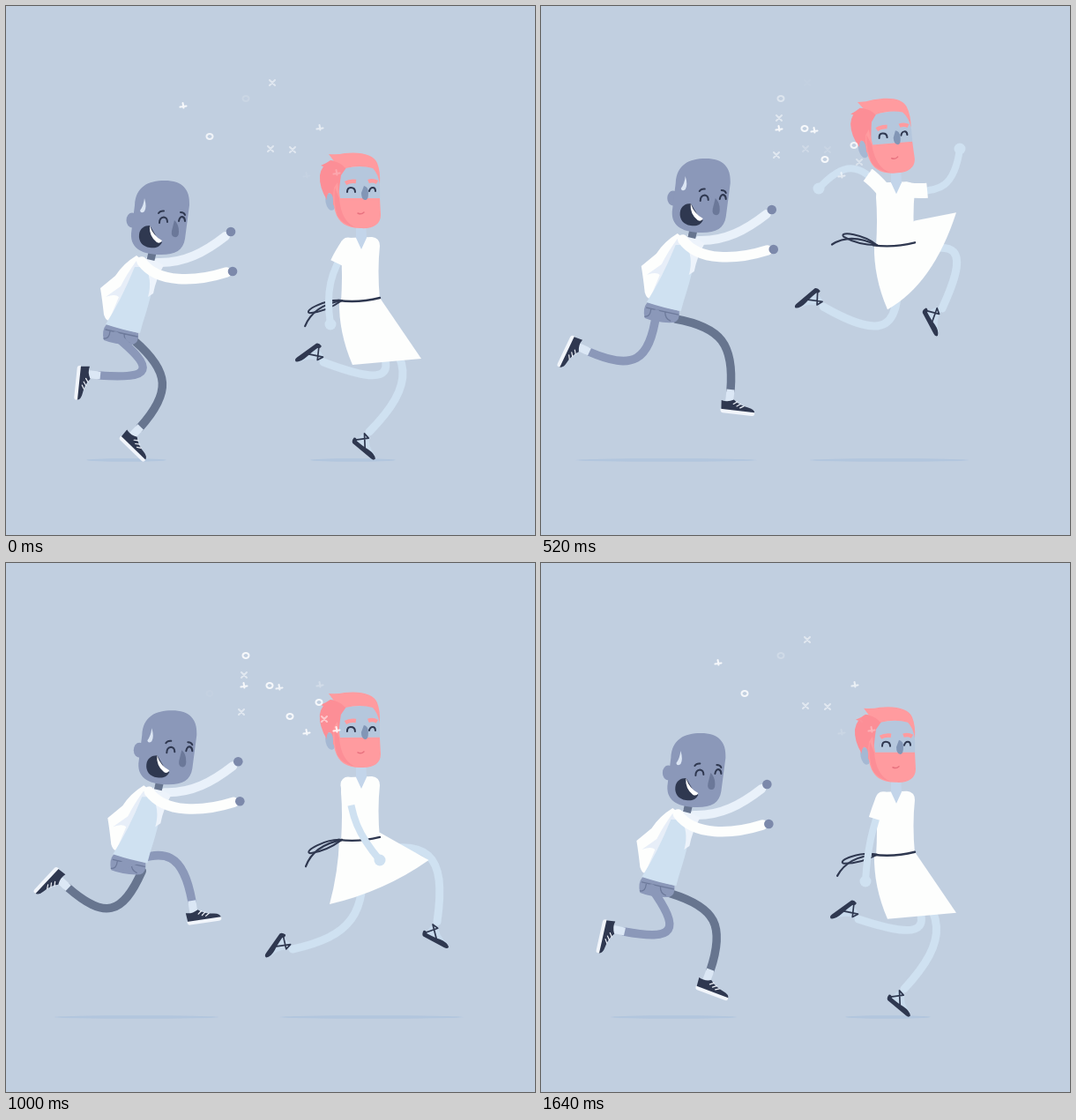
An HTML page with a canvas that plays this animation: 600 by 600 pixels, repeating every 1.68 s.

```html
<!DOCTYPE html>
<html lang="en">
<head>
<meta charset="utf-8">
<title>Chase</title>
<style>
html, body { margin: 0; width: 100%; height: 100%; overflow: hidden; background: #c1cfe0; }
canvas { display: block; width: 100vw; height: 100vh; }
</style>
</head>
<body>
<canvas id="stage" width="600" height="600"></canvas>
<script>
const ctx = document.getElementById('stage').getContext('2d');
const LOOP = 1680, STRIDE = LOOP / 2, STEP = 40;
const SKY = '#c1cfe0', WHITE = '#fdfefd', INK = '#2f3850';
const SKIN = '#cfe1f1', DENIM = '#8b98b9', DARK = '#67758f', HAND = '#7c89ab';

// Smooth periodic interpolation through a few key poses.
function track(period, times, rows) {
  const n = times.length;
  const row = i => rows[(i + n) % n];
  const span = i => (times[(i + 1 + n) % n] - times[(i + n) % n] + period) % period;
  const rate = (i, k) => (row(i + 1)[k] - row(i)[k]) / span(i);
  const slope = (i, k) =>
    (rate(i - 1, k) * span(i) + rate(i, k) * span(i - 1)) / (span(i) + span(i - 1));
  return time => {
    const t = time % period;
    let i = n - 1;
    while (times[i] > t) i--;
    const h = span(i), u = (t - times[i]) / h, v = 1 - u;
    return row(i).map((a, k) =>
      a * v * v * (1 + 2 * u) + row(i + 1)[k] * u * u * (3 - 2 * u) +
      h * u * v * (slope(i, k) * v - slope(i + 1, k) * u));
  };
}

// One bounce per period; skew moves its peak earlier or later.
function hop(t, period, height, skew, power) {
  const q = t % period / period;
  const u = q + skew * Math.sin(Math.PI * q) ** 2;
  return height * Math.sin(Math.PI * u) ** power;
}

// A bent limb of fixed length: its curve and the direction of its end in degrees.
function limb([x0, y0], [x1, y1], length, side) {
  const dx = x1 - x0, dy = y1 - y0, chord = Math.hypot(dx, dy);
  const h = side * Math.sqrt(Math.max(0, length ** 2 - chord ** 2)) / 2 / chord;
  const kx = (x0 + x1) / 2 + dy * h, ky = (y0 + y1) / 2 - dx * h;
  const ax = kx - dx * .12, ay = ky - dy * .12, bx = kx + dx * .12, by = ky + dy * .12;
  return {
    d: `M${x0} ${y0}C${ax} ${ay} ${bx} ${by} ${x1} ${y1}`,
    angle: Math.atan2(y1 - by, x1 - bx) * 180 / Math.PI
  };
}

function fill(color, d) {
  ctx.fillStyle = color;
  ctx.fill(new Path2D(d));
}
function line(color, width, d, cap = 'round') {
  ctx.strokeStyle = color;
  ctx.lineWidth = width;
  ctx.lineCap = cap;
  ctx.lineJoin = 'round';
  ctx.stroke(new Path2D(d));
}
function oval(color, x, y, rx, ry = rx, turn = 0) {
  ctx.fillStyle = color;
  ctx.beginPath();
  ctx.ellipse(x, y, rx, ry, turn, 0, Math.PI * 2);
  ctx.fill();
}
function at(x, y, deg, draw) {
  ctx.save();
  ctx.translate(x, y);
  ctx.rotate(deg * Math.PI / 180);
  draw();
  ctx.restore();
}
// The shadow spans both feet.
function shadow(a, b) {
  const left = Math.min(a[0], b[0]) - 15, right = Math.max(a[0], b[0]) + 30;
  oval('#b2c6de', (left + right) / 2, 515, (right - left) / 2, 1.8);
}

// Runner: both ankles follow the same path, half a stride apart.
const stride = track(STRIDE, [0, 100, 160, 380, 420, 520, 580, 800], [
  [152, 478], [54, 392], [70, 368], [94, 418], [106, 419], [215, 436], [211, 384], [192, 462]
]);

function sneaker() {
  fill('#dbe7f5', 'M-4.5 -1H4.5V14H-4.5Z');
  fill(INK, 'M-8 23L-9 12Q-2 14 5 10Q12 16 22 17Q30 18 30 23Z');
  fill('#f1f5fb', 'M-9 22H30Q31 26 27 26H-6Q-9 26 -9 22Z');
  line('#f1f5fb', 1.2, 'M5 15L9 12M9 17L13 14M13 18.5L17 16');
}
function runnerLeg(color, hip, ankle) {
  const leg = limb(hip, ankle, 124, 1);
  line(color, 9.5, leg.d);
  at(...ankle, leg.angle - 88, sneaker);
}

function runnerHead() {
  line(DARK, 9, 'M167 276L164 288', 'butt');
  oval(DENIM, 143, 243, 6.5, 8.5);
  fill(DENIM, 'M146 226C147 205 161 198 180 198C200 198 209 208 208 226L203 264' +
    'C201 277 192 282 176 282C156 282 141 276 142 258Z');
  fill('#dbe5f3', 'M157 218Q160 228 157 233Q153 236 152 232Q156 227 157 218Z');
  line(INK, 2, 'M173 235Q175 232 179 232.500M198 234Q202 234 203 237');
  line(INK, 2, 'M174 246Q174 240 179 239.500Q183 240 183 245M196 244Q197 239 200 239Q203 240 203 244');
  fill('#6b7899', 'M191 243Q196 247 196 256Q196 263 191 262Q187 261 188 255Z');
  fill(INK, 'M163 249C168 256 170 263 177 268C174 274 169 275 163 274' +
    'C155 273 150 267 151 259C152 252 157 249 163 249Z');
  fill('#fff', 'M163 249Q167 261 177 266Q175 270 171 268Q162 261 163 249Z');
}

function runner(t) {
  const rise = hop(t, STRIDE / 2, 31, .18, 1.3), x = rise * .27;
  const far = stride(t), near = stride(t + STRIDE / 2);
  const onBody = draw => at(x, -rise, 0, draw);
  shadow(far, near);
  onBody(() => {
    line('#e9f1fa', 10, 'M172 291C202 292 226 279 249 261');
    oval(HAND, 255, 256, 5.3);
  });
  runnerLeg(DARK, [146 + x, 380 - rise], far);
  onBody(() => {
    fill(DENIM, 'M114 361L150 371Q151 382 144 384Q126 385 111 379Q108 368 114 361Z');
    line('#6d7a9b', 1.3, 'M113 367Q130 371 149 375M118 369Q117 378 111 377M134 372Q134 380 140 382');
  });
  runnerLeg(DENIM, [124 + x, 374 - rise], near);
  onBody(() => {
    fill(WHITE, 'M148 283Q133 292 124 306L107 320Q109 332 111 350Q114 359 118 356' +
      'Q128 346 140 330L170 300Z');
    fill('#e7eef8', 'M148 289Q137 304 130 318L113 330Q124 326 128 330L118 354L136 330L152 296Z');
    fill(SKIN, 'M146 296L170 296Q168 320 155 360L152 371Q134 368 113 361Q130 335 146 296Z');
    fill('#edf3fb', 'M160 284L179 294Q170 310 167 326L161 330Q167 310 156 292Z');
    line(WHITE, 11.5, 'M154 290C172 315 215 313 250 302');
    oval(HAND, 257, 301, 5.3);
    runnerHead();
  });
}

// Dancer: key poses of two successive leaps.
const POSES = [0, 160, 520, 800, 1000, 1360, 1640];
const dance = (...rows) => track(LOOP, POSES, [...rows, rows[0]]);
// Ankle, toe direction, amount of bend.
const legA = dance([412, 483, 40, 1], [358, 466, 72, .1], [320, 341, 140, 1],
  [378, 437, 105, 1], [489, 407, 28, 1], [556, 321, -40, 1]);
const legB = dance([360, 404, 144, 1], [377, 387, 130, 1], [455, 343, 62, .9],
  [410, 486, 33, .2], [325, 438, 125, .8], [271, 318, 168, 1]);
const handL = dance([368, 361], [302, 256], [315, 207], [370, 357], [424, 337], [326, 239]);
const handR = dance([412, 345], [509, 263], [475, 162], [412, 340], [412, 325], [450, 160]);
// How far the skirt swings up, and how wide the split opens it.
const swing = dance([0, 0], [36, 0], [103, 0], [76, 0], [43, .5], [78, 1]);
const leap = t => -hop(t, STRIDE, 63.5, -.09, 1.6);

function slipper() {
  fill('#c8daec', 'M-5 18L-4 4H4Q8 13 22 16L23 20Z');
  line(INK, 1.7, 'M-6 17L4 6L-3 5L8 17');
  fill(INK, 'M-9 16Q-7 14 -4 17Q6 17 12 16Q21 15 25 19Q25 22 21 22H-6Q-9 21 -9 16Z');
}
function dancerLeg(y, [ax, ay, toe, bend]) {
  line(SKIN, 9, limb([403, 350 + y], [ax, ay], 175, bend).d);
  at(ax, ay, toe, slipper);
}
function dancerArm(x, y, hand) {
  const { d } = limb([x, y], hand, 96, -1);
  line(SKIN, 8, d);
  oval(SKIN, ...hand, 6.5);
  oval(WHITE, x, y, 8.5);
  ctx.setLineDash([24, 999]);
  line(WHITE, 17, d, 'butt');
  ctx.setLineDash([]);
}

function skirt(y, [rise, split]) {
  const rx = 471 + 17 * split, ry = 400 - rise, lx = 393 - 52 * split, ly = 407;
  const sag = rise / 4;
  at(0, y, 0, () => fill(WHITE, `M378 333L424 ${331 - rise * .24 * (1 - split)}L${rx} ${ry}` +
    `Q${(rx + lx) / 2 + sag / 2} ${(ry + ly) / 2 + sag} ${lx} ${ly}Q377 370 378 333Z`));
}

// The sash trails behind the leap.
function sash(t) {
  line(INK, 2.4, 'M377 334Q400 337 424 331');
  const droop = 42 + leap(t + LOOP - 80) * .7;
  at(381, 334, -droop, () => {
    line(INK, 2.2, 'M0 0Q-30 -14 -51 0');
    line(INK, 2, 'M0 0C-14 -12 -44 -16 -38 -9Q-22 0 0 0');
  });
}

function dancerHead() {
  const pink = '#ff9b9f', rose = '#fc8e96';
  oval('#a5b8d3', 368, 222, 5.5, 10, -.2);
  fill('#b5c7dd', 'M376 184L420 181Q425 190 424 222H378Z');
  fill(rose, 'M357 181Q364 178 368 175L390 178Q384 186 380 192Q378 204 377 222L371 226' +
    'Q372 212 366 212Q363 216 364 220Q355 205 356 192Q357 186 360 182Z');
  fill(pink, 'M366 168Q376 169 384 167C404 165 417 169 421 178Q425 188 424 202' +
    'Q422 190 416 184Q402 180 385 184Q380 178 372 176Z');
  fill(pink, 'M376 200L379 218H424L425 237C425 248 416 253 402 252' +
    'C386 252 377 246 373 232Q370 220 372 206Z');
  fill(rose, 'M373 206Q371 222 376 238Q382 248 396 251Q380 244 378 218Z');
  line(pink, 4.5, 'M385 201Q390 198 397 199M411 199Q416 197 421 200', 'butt');
  line(INK, 2, 'M387 211Q387 206 391 206Q396 206 396 211M412 210Q413 206 416 206Q419 206 419 210');
  fill('#8296b6', 'M406 204Q411 205 411 212Q411 221 407 220Q403 219 403 212Z');
  line('#e8727f', 1.5, 'M399 235Q403 237 406 234');
}

function dancer(t) {
  const y = leap(t), a = legA(t), b = legB(t);
  shadow(a, b);
  dancerLeg(y, a);
  dancerLeg(y, b);
  dancerArm(414, 271 + y, handR(t));
  skirt(y, swing(t));
  at(0, y, 0, () => {
    fill(WHITE, 'M389 263L415 262Q424 263 424 272Q421 300 424 333L380 336' +
      'Q382 305 380 280Q379 267 389 263Z');
    fill('#c3d5ea', 'M397 244H408L409 263L403 276L397 263Z');
    sash(t);
  });
  dancerArm(388, 271 + y, handL(t));
  at(403, 250 + y, Math.min(0, (y + 19) * .115), () => {
    ctx.translate(-403, -250);
    dancerHead();
  });
}

// Sparks in order of appearance: a first shower, then a second.
const FIRST = 11;
const sparks = [
  ['+', 310, 141], ['o', 299, 139], ['o', 322, 174], ['+', 270, 139], ['x', 270, 127],
  ['x', 267, 169], ['o', 355, 158], ['x', 361, 177], ['+', 341, 192], ['o', 272, 105],
  ['+', 375, 189], ['+', 356, 138], ['o', 231, 148], ['+', 201, 113], ['x', 302, 87],
  ['x', 325, 163], ['x', 300, 162]
];
const marks = {
  o: 'M-3.500 0A3.500 3 0 1 1 3.500 0A3.500 3 0 1 1 -3.500 0',
  x: 'M-3 -3L3 3M3 -3L-3 3',
  '+': 'M-3.500 1.500L3.500 .5M-.5 -3L.5 2.500'
};
function drawSpark([kind, x, y], i, t) {
  const start = i < FIRST ? i * 40 : 900 + (i - FIRST) * 80;
  const life = i < FIRST ? 1400 : 1100;
  const age = (t - start + LOOP) % LOOP;
  const fade = Math.max(0, Math.min(1, age / 300, (life - age) / 450));
  ctx.globalAlpha = fade * (kind === 'x' ? .5 : .85);
  at(x, y, 0, () => line('#fff', 2.1, marks[kind]));
  ctx.globalAlpha = 1;
}

function frame() {
  const t = Math.floor(performance.now() % LOOP / STEP) * STEP;
  ctx.fillStyle = SKY;
  ctx.fillRect(0, 0, 600, 600);
  runner(t);
  dancer(t);
  sparks.forEach((spark, i) => drawSpark(spark, i, t));
  requestAnimationFrame(frame);
}
frame();
</script>
</body>
</html>
```
